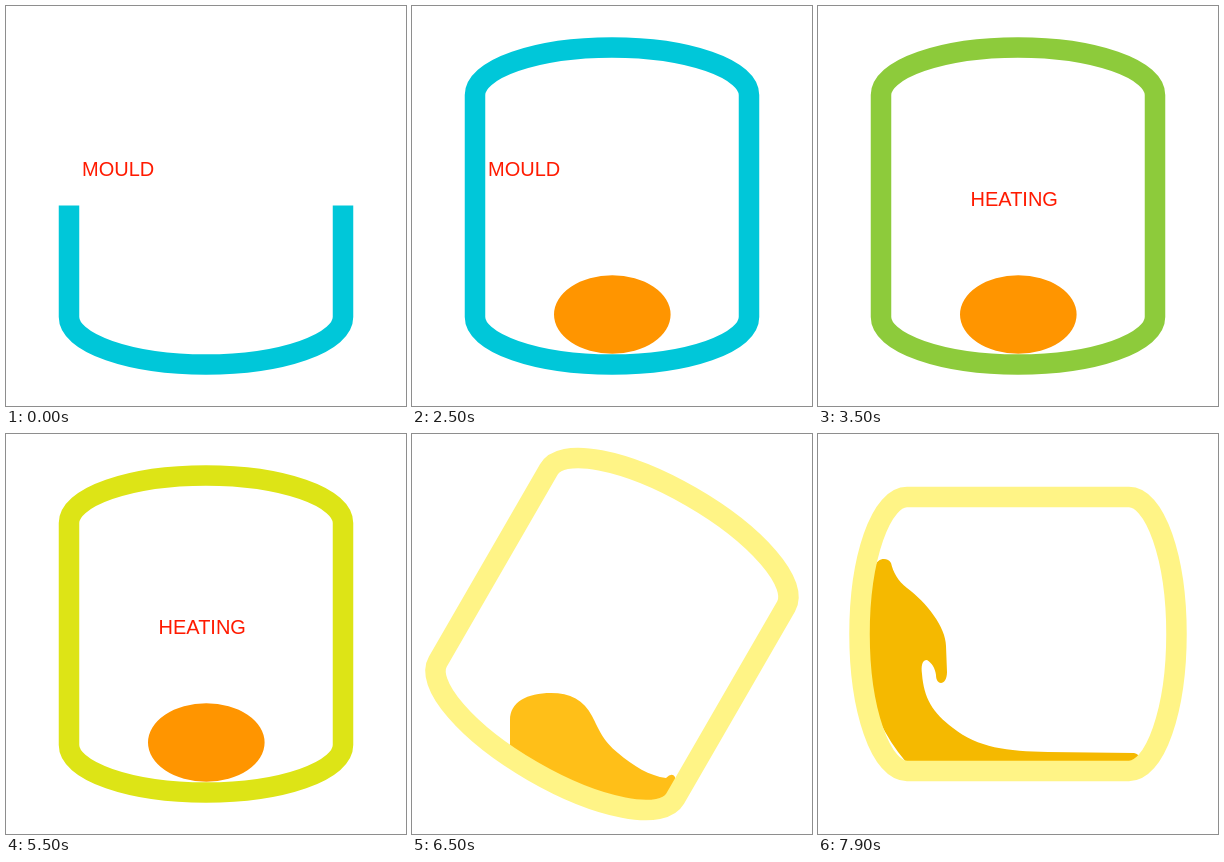
Write an HTML page that moves like this. It is 400x400 px and loops after 8 s.

```html
<!DOCTYPE html>
<html lang="en">
<head>
<meta charset="utf-8">
<style>
  html, body { margin: 0; height: 100%; overflow: hidden; background: #fff; }
  svg { display: block; width: 100%; height: 100%; }
  text { font: 20px "Liberation Sans", Arial, sans-serif; fill: #ff1a00; }
</style>
</head>
<body>
<svg viewBox="0 0 400 400">
  <path id="liquid"/>
  <path id="mould" fill="none" stroke-width="20.5"/>
  <text id="label"></text>
</svg>
<script>
const OPEN = "M63 199.5V311A137 47.5 0 0 0 337 311V199.5";
const CLOSED = "M63 89V311A137 47.5 0 0 0 337 311V89A137 47.5 0 0 0 63 89Z";

const POWDER = "M142 308.5a58.3 39.3 0 0 1 116.6 0a58.3 39.3 0 0 1 -116.6 0Z";
const SLUMP = "M98 318V286C98 268 115 259 139 259C158 259 172 266 180 282" +
  "C187 295 190 306 206 319C221 332 238 342 254 344Q260 338 263 343" +
  "Q264 350 258 364Q200 385 98 318Z";
const CLIMB = "M36 213C42 190 75 182 95 198C122 219 120 255 145 285" +
  "C165 311 200 324 230 320Q240 321 237 332L168 372Q72 318 36 213Z";
const WAVE = "M57 133C59 123 70 123 73 129C75 138 80 147 89 154" +
  "C108 168 128 193 128 212L129 238C129 252 118 252 118 241" +
  "C117 234 114 229 109 226C104 226 103 232 104 240C106 264 114 278 135 294" +
  "C160 314 189 317 230 318L316 319C323 320 322 327 315 328H88Q22 250 57 133Z";

const MOULD_TEXT = ["MOULD", 76, 170];
const HEATING_TEXT = ["HEATING", 152.5, 200];
const ORANGE = "#ff9500";
const HOT = "#fff486";

const scenes = [
  { at: 0, shape: OPEN, color: "#00c7d9", text: MOULD_TEXT },
  { at: 500, shape: OPEN, color: "#00c7d9", text: MOULD_TEXT, liquid: POWDER, fill: ORANGE },
  { at: 2500, color: "#00c7d9", text: MOULD_TEXT, liquid: POWDER, fill: ORANGE },
  { at: 3500, color: "#8dcb3b", text: HEATING_TEXT, liquid: POWDER, fill: ORANGE },
  { at: 4500, color: "#b7d82a", text: HEATING_TEXT, liquid: POWDER, fill: ORANGE },
  { at: 5500, color: "#dde416", text: HEATING_TEXT, liquid: POWDER, fill: ORANGE },
  { at: 6500, color: HOT, angle: 30, liquid: SLUMP, fill: "#ffbf18" },
  { at: 7300, color: HOT, angle: 60, liquid: CLIMB, fill: "#fabc0c" },
  { at: 7900, color: HOT, angle: 90, liquid: WAVE, fill: "#f5b900" }
];

const LOOP = 8000;
const [liquid, mould, label] = ["liquid", "mould", "label"].map(id => document.getElementById(id));
const set = (node, attributes) => {
  for (const name in attributes) node.setAttribute(name, attributes[name]);
};

let current;
function show(scene) {
  const { shape = CLOSED, color, angle = 0, text = ["", 0, 0], fill = "none" } = scene;
  set(mould, { d: shape, stroke: color, transform: `rotate(${angle} 200 200)` });
  set(liquid, { d: scene.liquid || "", fill });
  const [words, x, y] = text;
  label.textContent = words;
  set(label, { x, y });
}

const start = performance.now();
function tick() {
  const time = (performance.now() - start) % LOOP;
  const scene = scenes.findLast(s => s.at <= time);
  if (scene !== current) show(current = scene);
  requestAnimationFrame(tick);
}
tick();
</script>
</body>
</html>
```
